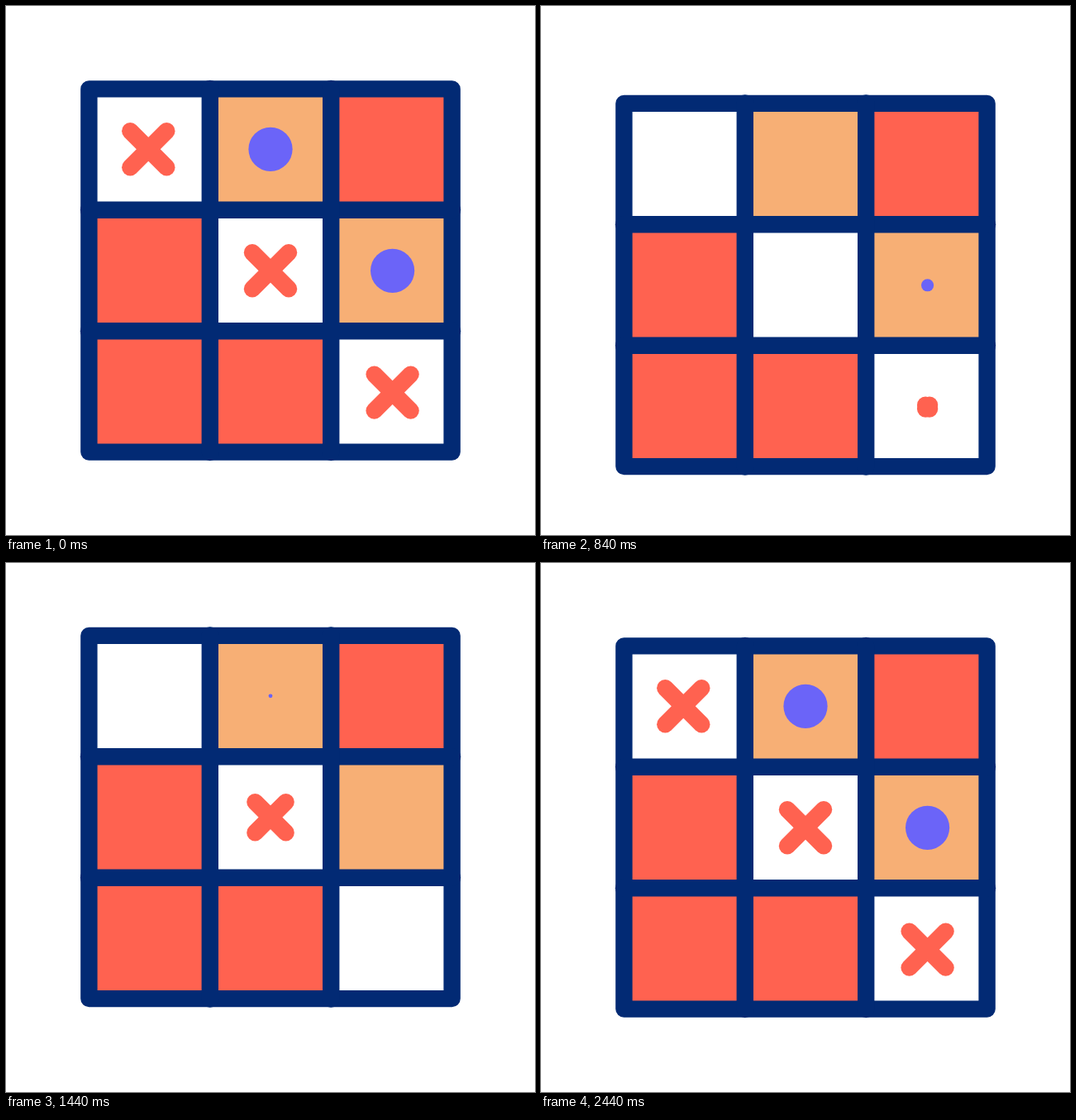
Write an HTML page with a canvas that moves like this. It is 640 by 640 pixels and loops after 2800 ms.

```html
<!DOCTYPE html>
<html lang="en">
<head>
<meta charset="utf-8">
<title>Tic-tac-toe</title>
<style>
html, body { margin: 0; width: 100%; height: 100%; overflow: hidden; background: #fff; }
canvas { display: block; width: 100vmin; height: 100vmin; }
</style>
</head>
<body>
<canvas width="640" height="640"></canvas>
<script>
const ctx = document.querySelector('canvas').getContext('2d');
const LOOP = 2800, STEP = 40;
const NAVY = '#022a74', RED = '#ff6250', TAN = '#f7af75', BLUE = '#6b64f8', WHITE = '#fff';
const EDGE = 100.4, CELL = 146.4, LINE = 20.4;
const CELLS = [WHITE, TAN, RED, RED, WHITE, TAN, RED, RED, WHITE];

// Each mark leaves at `out` and returns at `back` (ms).
const crosses = [
  { x: 172.3, y: 173.2, out: 278, back: 2017 },
  { x: 320, y: 320.2, out: 358, back: 1150 },
  { x: 467.6, y: 467.6, out: 465, back: 1585 }
];
const dots = [
  { x: 320, y: 173.3, out: 192, back: 1432 },
  { x: 467.6, y: 320.3, out: 304, back: 1864 }
];

const progress = (t, start, length) => Math.min(1, Math.max(0, (t - start) / length));
const sine = u => (1 - Math.cos(Math.PI * u)) / 2;
const pullBack = u => u * u * (4.4 * u - 3.4);

// Vertical position of the board: down, up, rest.
const BOUNCE = [[501, 0], [921, 19.2], [1385, -13.3], [1730, 0]];
function boardY(t) {
  let y = 0;
  for (let i = 1; i < BOUNCE.length; i++) {
    const [t0, y0] = BOUNCE[i - 1], [t1, y1] = BOUNCE[i];
    y += (y1 - y0) * sine(progress(t, t0, t1 - t0));
  }
  return y;
}

const crossSize = (t, m) => t < m.back
  ? 1 - sine(progress(t, m.out, 478))
  : sine(progress(t, m.back, 390));

const dotSize = (t, m) => t < m.back
  ? 1 - pullBack(progress(t, m.out, 563))
  : 1 - pullBack(1 - progress(t, m.back, 550));

function line(x0, y0, x1, y1) {
  ctx.beginPath();
  ctx.moveTo(x0, y0);
  ctx.lineTo(x1, y1);
  ctx.stroke();
}

function drawBoard() {
  CELLS.forEach((color, i) => {
    ctx.fillStyle = color;
    ctx.fillRect(EDGE + i % 3 * CELL, EDGE + Math.floor(i / 3) * CELL, CELL, CELL);
  });
  ctx.strokeStyle = NAVY;
  ctx.strokeRect(EDGE, EDGE, 3 * CELL, 3 * CELL);
  for (const i of [1, 2]) {
    const p = EDGE + i * CELL;
    line(p, 100, p, 540);
    line(100, p, 540, p);
  }
}

function draw(t) {
  ctx.setTransform(1, 0, 0, 1, 0, 0);
  ctx.fillStyle = WHITE;
  ctx.fillRect(0, 0, 640, 640);
  ctx.translate(0, boardY(t));
  ctx.lineWidth = LINE;
  ctx.lineCap = ctx.lineJoin = 'round';
  drawBoard();

  ctx.strokeStyle = RED;
  for (const m of crosses) {
    const a = 22 * crossSize(t, m);
    if (a < 1e-6) continue;
    line(m.x - a, m.y - a, m.x + a, m.y + a);
    line(m.x + a, m.y - a, m.x - a, m.y + a);
  }

  ctx.fillStyle = BLUE;
  for (const m of dots) {
    ctx.beginPath();
    ctx.arc(m.x, m.y, 26.6 * Math.max(0, dotSize(t, m)), 0, 2 * Math.PI);
    ctx.fill();
  }
}

const start = performance.now();
function tick() {
  const t = (performance.now() - start) % LOOP;
  draw(Math.floor(t / STEP) * STEP);
  requestAnimationFrame(tick);
}
tick();
</script>
</body>
</html>
```
